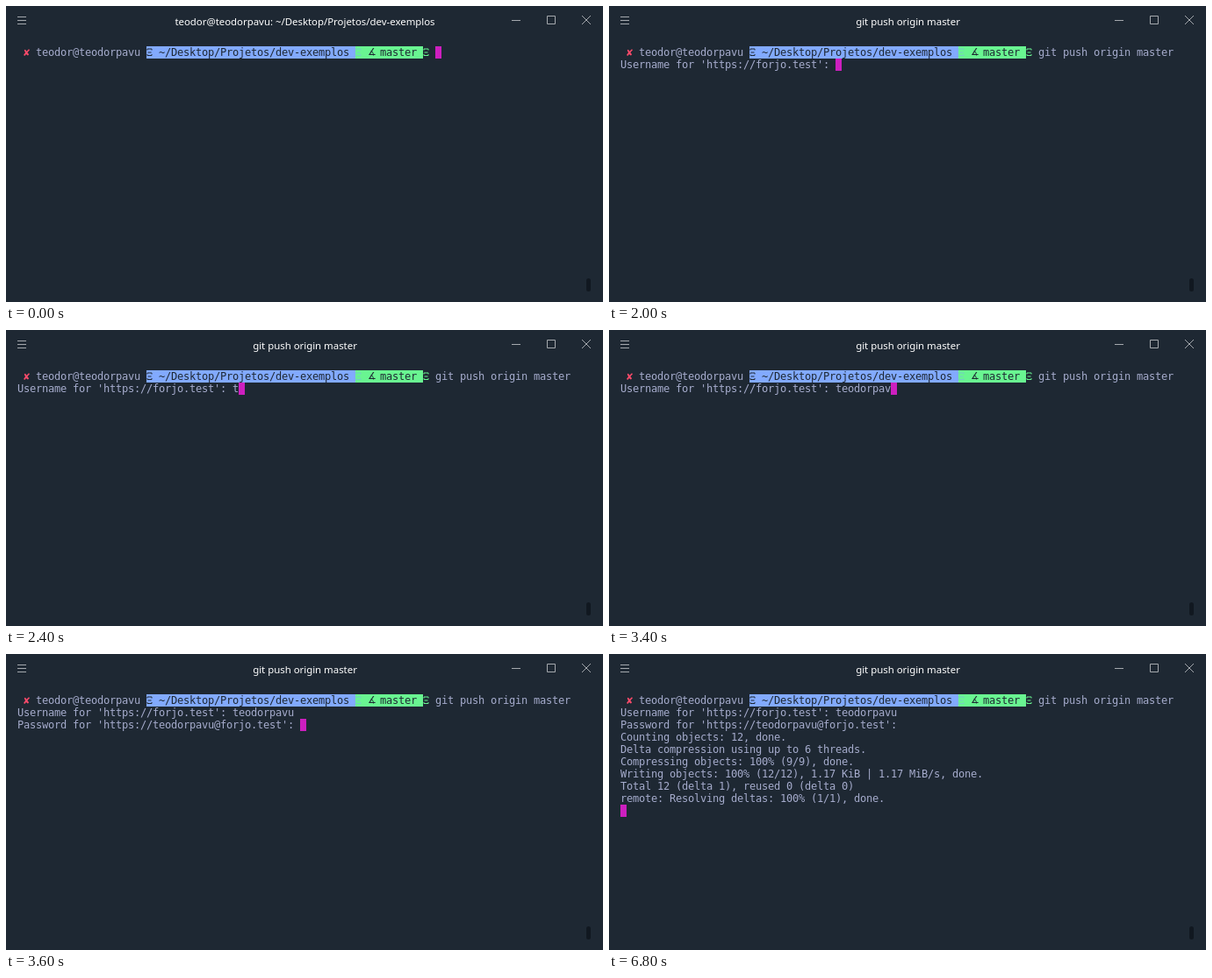
An HTML page for the animation above (8000 ms loop, 680 by 338 pixels).

```html
<!DOCTYPE html>
<html lang="en">
<head>
<meta charset="utf-8">
<title>Terminal</title>
<style>
  html, body { margin: 0; width: 100%; height: 100%; overflow: hidden; background: #1e2833; }
  #stage { position: relative; width: 680px; height: 338px; overflow: hidden; }
  #title {
    position: absolute; left: 0; top: 9px; width: 681px; text-align: center;
    font: 11.4px/17px "Noto Sans", "Open Sans", sans-serif; color: #fff; white-space: pre;
  }
  #chrome { position: absolute; left: 0; top: 0; }
  #screen span, #cursor { position: absolute; height: 14px; }
  #screen span {
    font: 12px/14px "DejaVu Sans Mono", monospace;
    letter-spacing: calc(7px - 1ch); white-space: pre; color: #a6accd;
  }
  #screen .cross { color: #ff4b6b; }
  #screen .path { background: #82aaff; color: #1e2833; }
  #screen .branch { background: #69f591; color: #1e2833; }
  #screen .angle { font: 11px/14px "DejaVu Sans", sans-serif; letter-spacing: 0; color: #1e2833; }
  #cursor { width: 7px; background: #cd1fbf; }
</style>
</head>
<body>
<div id="stage">
  <div id="title"></div>
  <div id="screen"></div>
  <div id="cursor"></div>
  <svg id="chrome" width="680" height="338" fill="none">
    <g stroke="#a5a9ae">
      <path d="M13 12.5h10M13 16.5h10M13 20.5h10"/>
      <path d="M576 16.5h10M616.5 11.5h9v9h-9zM656 11l10 10M666 11l-10 10"/>
    </g>
    <rect x="661" y="311" width="5" height="15" rx="2.5" fill="#111820"/>
    <g id="seps"></g>
  </svg>
</div>
<script>
const LEFT = 13, TOP = 46, CELL = 7, ROW = 14, LOOP = 8000;
const $ = id => document.getElementById(id);
const colX = col => LEFT + col * CELL;
const rowY = row => TOP + row * ROW;

const login = 'teodorpavu';
const account = 'teodor@' + login;
const folder = '~/Desktop/Projetos/dev-exemplos';
const command = 'git push origin master';
const askUser = "Username for 'https://forjo.test': ";
const askPass = `Password for 'https://${login}@forjo.test': `;
const report = [
  'Counting objects: 12, done.',
  'Delta compression using up to 6 threads.',
  'Compressing objects: 100% (9/9), done.',
  'Writing objects: 100% (12/12), 1.17 KiB | 1.17 MiB/s, done.',
  'Total 12 (delta 1), reused 0 (delta 0)',
  'remote: Resolving deltas: 100% (1/1), done.'
];

const typed = n => [askUser + login.slice(0, n)];
const asked = [askUser + login, askPass];

// Start time and the lines below the prompt; the cursor ends the last line.
const steps = [
  [0, null],
  [800, ['']],
  [2000, typed(0)],
  [2400, typed(1)],
  [2700, typed(3)],
  [2800, typed(5)],
  [3000, typed(6)],
  [3100, typed(7)],
  [3400, typed(9)],
  [3500, typed(10)],
  [3600, asked],
  [6300, [...asked, '']],
  [6800, [...asked, ...report, '']]
];

function put(col, row, text, cls = '') {
  const el = document.createElement('span');
  el.className = cls;
  el.textContent = text;
  el.style.left = colX(col) + 'px';
  el.style.top = rowY(row) + 'px';
  $('screen').append(el);
}

function separator(col, color) {
  const el = document.createElementNS('http://www.w3.org/2000/svg', 'path');
  el.setAttribute('d', 'M1.5 5V3.5H6.5V5M2 7.5H6M1.5 9.5V11H6.5V9.5');
  el.setAttribute('transform', `translate(${colX(col) - 0.5} ${TOP - 0.5})`);
  el.setAttribute('stroke', color);
  $('seps').append(el);
}

function drawPrompt() {
  put(1, 0, '✘', 'cross');
  put(3, 0, account);
  put(21, 0, '  ' + folder + ' ', 'path');
  put(55, 0, '    master ', 'branch');
  put(57, 0, '∡', 'angle');
}

function show(lines) {
  $('screen').replaceChildren();
  drawPrompt();
  $('title').textContent = lines ? command : `${account}: ${folder}`;
  if (lines) put(68, 0, command);
  (lines || []).forEach((text, i) => put(0, i + 1, text));
  const row = lines ? lines.length : 0;
  const col = lines ? lines[row - 1].length : 68;
  $('cursor').style.left = colX(col) + 'px';
  $('cursor').style.top = rowY(row) + 'px';
}

separator(21, '#1e2833');
separator(55, '#75cfc4');
separator(66, '#69f591');

let current = -1;
const start = performance.now();
function tick() {
  const t = (performance.now() - start) % LOOP;
  const next = steps.findLastIndex(([at]) => at <= t);
  if (next !== current) show(steps[current = next][1]);
  requestAnimationFrame(tick);
}
tick();
</script>
</body>
</html>
```
